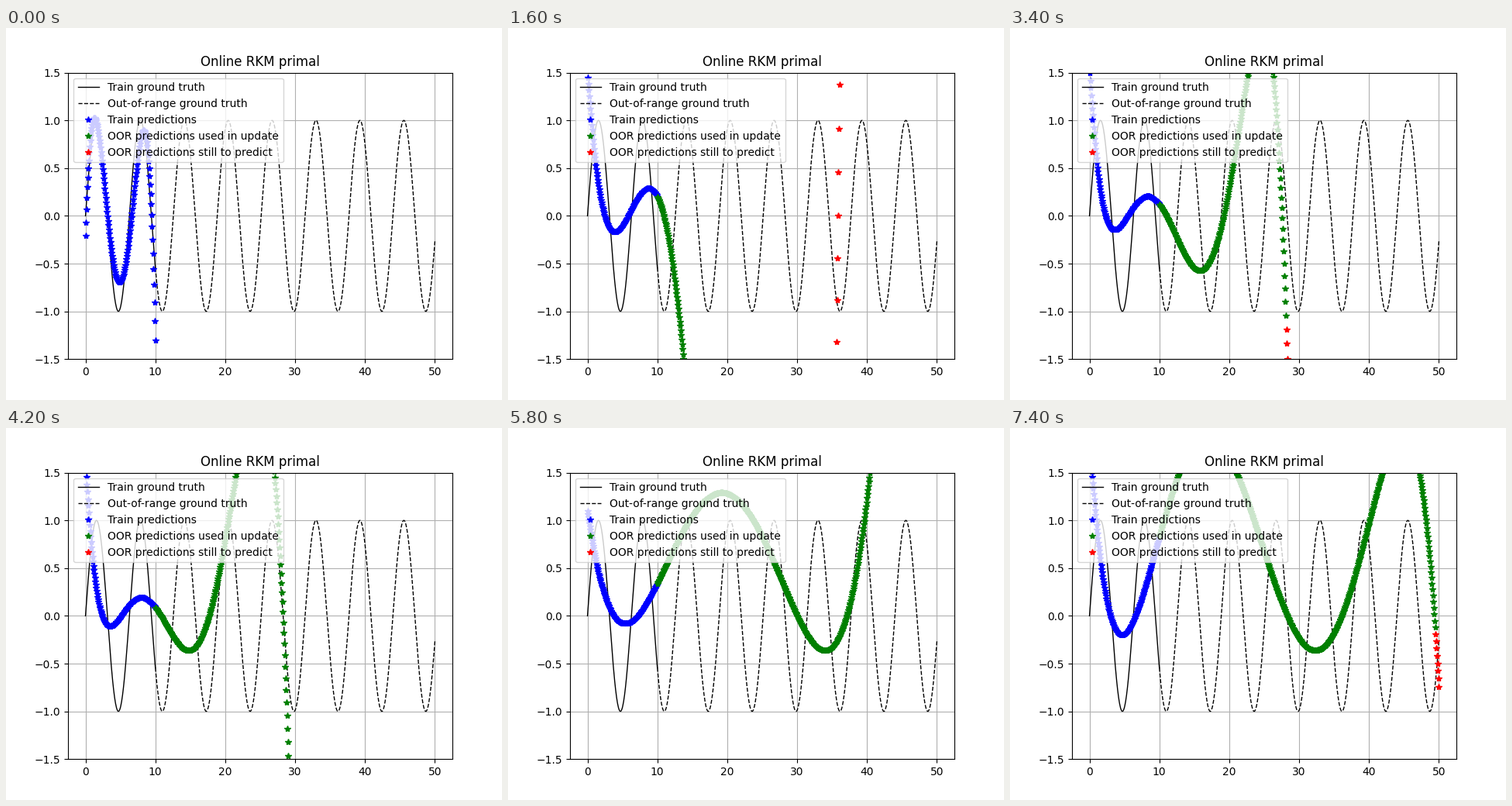
A matplotlib script that plays this animation: 640x480 px, repeating every 7500 ms.

```python
import numpy as np
import matplotlib.pyplot as plt
from matplotlib.animation import FuncAnimation

FRAMES, STEP, TRAIN = 75, 8, 150
OOR = FRAMES * STEP
DEGREE = 6
x_train = np.linspace(0, 10, TRAIN)
x_oor = np.linspace(10, 50, OOR)

# Update step -> value at x = 0, then the zeros of the fitted polynomial.
fits = {
    0: (-.21, .1, 3.15, 6.6, 9.47),
    1: (1.3, 2.3, 5.5, 9.2),
    9: (1.4, 2.7, 6, 10.6),
    22: (1.62, 2.3, 5.7, 11.2, 19.3),
    34: (1.58, 2.3, 5.5, 11, 19.2, 27.55),
    50: (1.68, 2.5, 4.8, 10.6, 16.4, 29, 34.8),
    58: (1.1, 3.8, 7.2, 30, 37.1),
    74: (1.85, 3, 6.6, 28.3, 36.1, 49.35),
}


def inverse_zeros(zeros):
    """Missing zeros lie at infinity, so their inverse is 0."""
    return np.pad(1 / np.array(zeros), (0, DEGREE - len(zeros)))


steps = list(fits)
params = np.array([[start, *inverse_zeros(zeros)]
                   for start, *zeros in fits.values()])


def predict(t, x):
    start, *inv = (np.interp(t, steps, column) for column in params.T)
    return start * np.prod([1 - x * q for q in inv], axis=0)


fig, ax = plt.subplots(figsize=(6.4, 4.8), dpi=100)
ax.set(xlim=(-2.5, 52.5), ylim=(-1.5, 1.5), title="Online RKM primal")
ax.grid(True)
ax.plot(x_train, np.sin(x_train), "k-", lw=1, label="Train ground truth")
ax.plot(x_oor, np.sin(x_oor), "k--", lw=1, label="Out-of-range ground truth")
train, = ax.plot([], [], "b*", label="Train predictions")
used, = ax.plot([], [], "g*", label="OOR predictions used in update")
ahead, = ax.plot([], [], "r*", label="OOR predictions still to predict")
ax.legend(loc="upper left")


def update(t):
    now = t * STEP
    # Nothing is forecast before the first update.
    rest = x_oor[now:] if t else x_oor[:0]
    for line, x in (train, x_train), (used, x_oor[:now]), (ahead, rest):
        line.set_data(x, predict(t, x))
    return train, used, ahead


anim = FuncAnimation(fig, update, frames=FRAMES, interval=100, repeat=True)
plt.show()
```
